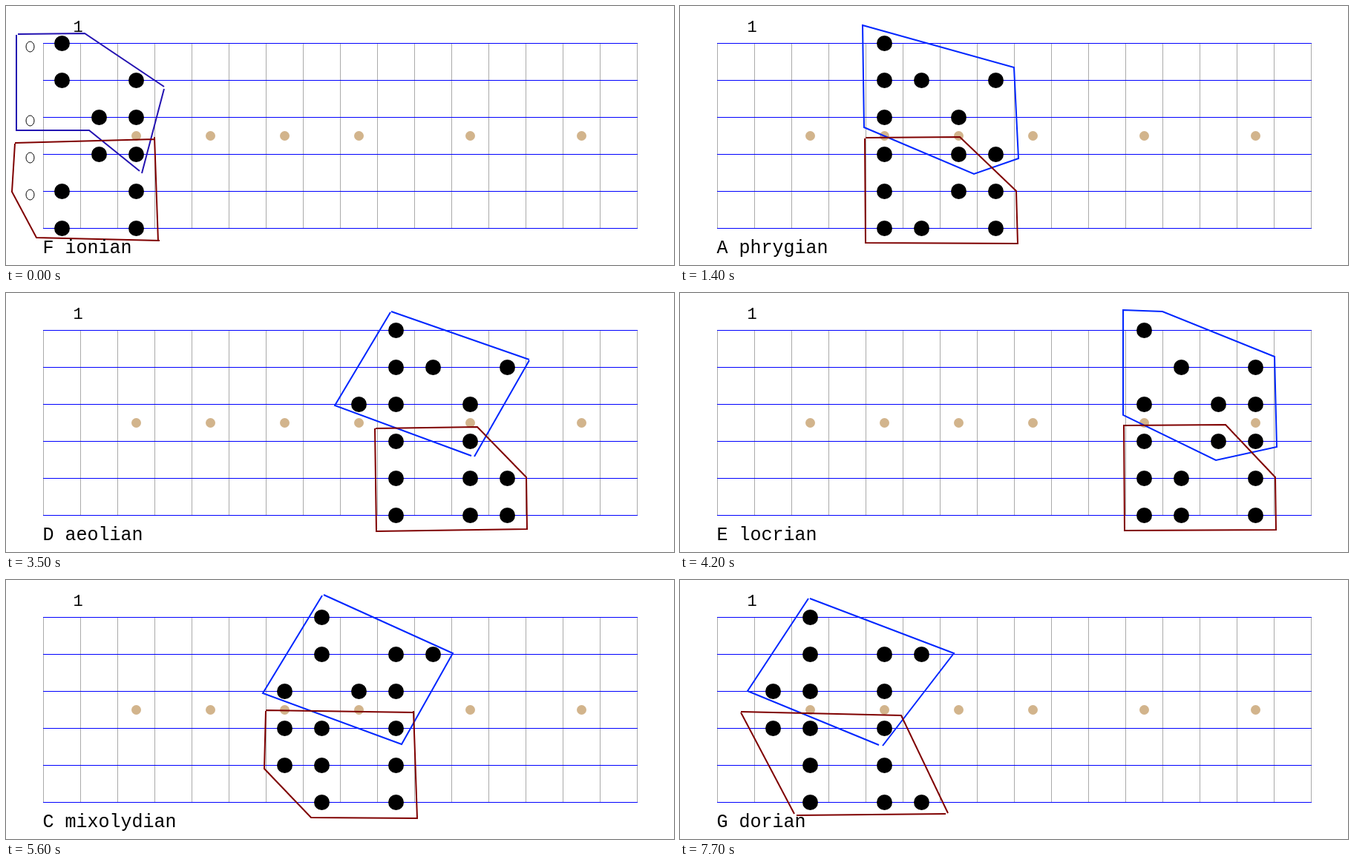
An HTML page with a canvas that plays this animation: 900 by 350 pixels, repeating every 8400 ms.

```html
<!DOCTYPE html>
<html lang="en">
<head>
<meta charset="utf-8">
<title>Modes on the fretboard</title>
<style>
html, body { margin: 0; width: 100%; height: 100%; overflow: hidden; background: #fff; }
canvas { display: block; }
</style>
</head>
<body>
<canvas id="board" width="900" height="350"></canvas>
<script>
const ctx = document.getElementById('board').getContext('2d');
const STEP = 700;
const GAP = 50;                                // between frets and strings
const TUNING = [24, 19, 15, 10, 5, 0];         // semitones above low E, top string first
const SCALE = [0, 1, 3, 5, 6, 8, 10];          // F major, counted from E
const INLAYS = [3, 5, 7, 9, 12, 15];
const BLUE = '#0026ff', RED = '#7f0000';

// root: fret on the low string; lo..hi: frets in reach; upper, lower: octave outlines
const modes = [
  { name: 'F ionian', root: 1, lo: 0, hi: 3, color: '#2312b1',
    upper: 'M16 38L106 37L213 109M213 112L183 226M180 223L112 168H14V39',
    lower: 'M12 185L200 180M200 177L205 318M207 317L41 313L8 251L12 186' },
  { name: 'G dorian', root: 3, lo: 2, hi: 6,
    upper: 'M175 25L369 99L273 224M268 223L91 150L173 25',
    lower: 'M82 178L298 183L361 315M358 316L157 318M154 316L82 179' },
  { name: 'A phrygian', root: 5, lo: 5, hi: 8,
    upper: 'M246 26L450 83L456 206L396 227L248 164Z',
    lower: 'M250 178L377 177L453 250L455 321L250 320L249 179' },
  { name: 'Bb lydian', root: 6, lo: 5, hi: 8,
    upper: 'M247 28L330 27L451 84L454 208L427 226L350 168L248 166Z',
    lower: 'M250 177L450 179L454 321L311 320L248 255Z' },
  { name: 'C mixolydian', root: 8, lo: 7, hi: 11,
    upper: 'M428 20L602 99L533 222L346 153L426 21',
    lower: 'M350 176L550 179M549 177L554 322L411 321L348 255L350 177' },
  { name: 'D aeolian', root: 10, lo: 9, hi: 13,
    upper: 'M519 25L705 90M705 91L631 221M627 220L443 152L518 26',
    lower: 'M498 183L635 181L701 249L702 319L499 322L497 183' },
  { name: 'E locrian', root: 12, lo: 12, hi: 15,
    upper: 'M597 23L650 25L801 86L804 208L722 226L597 165Z',
    lower: 'M598 179L735 178L802 249L803 320L599 321Z' }
];

function disc(x, y, r, color) {
  ctx.fillStyle = color;
  ctx.beginPath();
  ctx.arc(x, y, r, 0, 7);
  ctx.fill();
}

function text(str, x, y, size) {
  ctx.fillStyle = '#000';
  ctx.font = size + 'px "Liberation Mono", monospace';
  ctx.fillText(str, x, y);
}

function outline(path, color) {
  ctx.strokeStyle = color;
  ctx.lineWidth = 2;
  ctx.stroke(new Path2D(path));
}

const fretX = n => n * GAP + 25.5;
const stringY = s => (s + 1) * GAP + 0.5;

function drawBoard() {
  ctx.fillStyle = '#fff';
  ctx.fillRect(0, 0, 900, 350);
  ctx.fillStyle = '#aaa';
  for (let x = 50; x <= 850; x += GAP) ctx.fillRect(x, 50, 1, 251);
  ctx.fillStyle = '#00f';
  for (let y = 50; y <= 300; y += GAP) ctx.fillRect(50, y, 801, 1);
  for (const n of INLAYS) disc(fretX(n), 175.5, 6.5, '#d2b48c');
  text('1', 90.5, 35, 22);
}

function drawNote(string, fret) {
  const y = stringY(string);
  if (fret) return disc(fretX(fret), y, 10.5, '#000');
  ctx.strokeStyle = '#000';
  ctx.lineWidth = 1;
  ctx.beginPath();
  ctx.ellipse(32.5, y + 4.5, 5.5, 7, 0, 0, 7);
  ctx.stroke();
}

function drawMode({ name, root, lo, hi, upper, lower, color = BLUE }) {
  TUNING.forEach((open, s) => {
    for (let fret = lo; fret <= hi; fret++) {
      const note = open + fret;
      if (note >= root && note <= root + 24 && SCALE.includes(note % 12)) drawNote(s, fret);
    }
  });
  outline(upper, color);
  outline(lower, RED);
  text(name, 49.5, 334, 25);
}

// climb through the seven modes, then back down
function frame() {
  const k = Math.floor(performance.now() / STEP) % 12;
  drawBoard();
  drawMode(modes[Math.min(k, 12 - k)]);
  requestAnimationFrame(frame);
}
frame();
</script>
</body>
</html>
```
